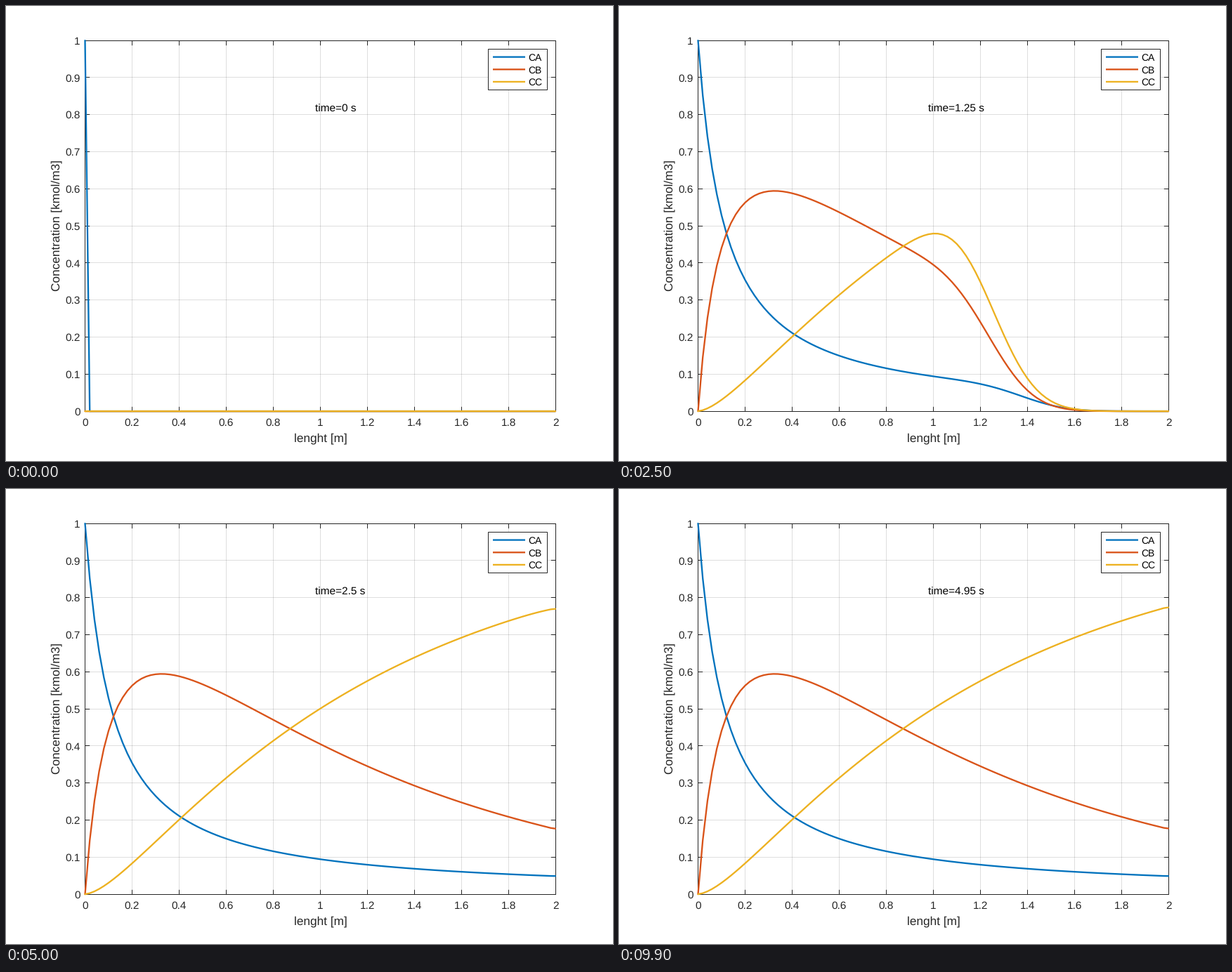
Recreate the animation shown at these times as a matplotlib script. Size 864 by 648 pixels, loop 10000 ms.

```python
import numpy as np
import matplotlib.pyplot as plt
from matplotlib.animation import FuncAnimation
from matplotlib.patches import Rectangle

plt.rcParams["font.family"] = "Liberation Sans"
plt.rcParams["text.hinting"] = "none"

W, H = 864, 648
LEFT, RIGHT, TOP, BOTTOM = 112.5, 782.0, 49.1, 577.1
COLORS = ("#0072BD", "#D95319", "#EDB120")
DARK = "#262626"
LINE_W = 2.31
TICK = 6.7
FRAMES, STEP, SUBSTEPS = 100, 0.05, 24

# Tubular reactor: A -> B (second order), B -> C (first order)
K1, K2, SPEED, DISPERSION = 10.0, 1.0, 1.0, 0.0087
LEAD = 0.007  # the feed enters slightly before the clock starts
x = np.linspace(0, 2, 101)
dx = x[1] - x[0]


def rate(c):
    a, b, _ = c
    r1, r2 = K1 * a * a, K2 * b
    d = np.array([-r1, r1 - r2, r2])
    slope = np.diff(c, axis=1) / dx
    d[:, 1:-1] += (DISPERSION * np.diff(slope, axis=1) / dx
                   - SPEED * (slope[:, 1:] + slope[:, :-1]) / 2)
    # no diffusive flux through the outlet
    d[:, -1] -= (2 * DISPERSION / dx + SPEED) * slope[:, -1]
    d[:, 0] = 0
    return d


def advance(c, span):
    h = span / SUBSTEPS
    for _ in range(SUBSTEPS):
        p = rate(c)
        q = rate(c + h / 2 * p)
        r = rate(c + h / 2 * q)
        s = rate(c + h * r)
        c = c + h / 6 * (p + 2 * q + 2 * r + s)
    return c


def solve():
    start = np.zeros((3, x.size))
    start[0, 0] = 1
    states = [start, advance(start, STEP + LEAD)]
    while len(states) < FRAMES:
        states.append(advance(states[-1], STEP))
    return states


def px(v):
    return LEFT + (RIGHT - LEFT) * v / 2


def py(v):
    return BOTTOM + (TOP - BOTTOM) * v


def mid(v):
    return np.floor(v) + 0.5


fig = plt.figure(figsize=(W / 72, H / 72), dpi=72, facecolor="white")
ax = fig.add_axes([0, 0, 1, 1])
ax.set(xlim=(0, W), ylim=(H, 0))
ax.axis("off")


def stroke(xs, ys, color=DARK, lw=1, z=2, cap="butt", **kw):
    return ax.plot(xs, ys, color=color, lw=lw, zorder=z, snap=False,
                   solid_capstyle=cap, solid_joinstyle="round", **kw)[0]


def label(lx, ly, s, size=15.43, color=DARK, **kw):
    return ax.text(lx, ly, s, fontsize=size, color=color, va="baseline",
                   zorder=6, **kw)


x0, x1, y0, y1 = mid(LEFT), mid(RIGHT), mid(BOTTOM), mid(TOP)

for i in range(11):
    gx, gy = mid(px(i / 5)), mid(py(i / 10))
    if 0 < i < 10:
        stroke([gx, gx], [y0, y1], alpha=0.15, z=1)
        stroke([x0, x1], [gy, gy], alpha=0.15, z=1)
    stroke([gx, gx], [y0, y0 - TICK])
    stroke([gx, gx], [y1, y1 + TICK])
    stroke([x0, x0 + TICK], [gy, gy])
    stroke([x1, x1 - TICK], [gy, gy])
    label(px(i / 5), 598.3, f"{i / 5:g}", ha="center")
    label(105.5, py(i / 10) + 5.6, f"{i / 10:g}", ha="right")

ax.add_patch(Rectangle((x0, y1), x1 - x0, y0 - y1, fill=False, ec=DARK,
                       lw=1, snap=False, zorder=2))
label(447.5, 620.5, "lenght [m]", size=17.2, ha="center")
label(76.5, 312.8, "Concentration [kmol/m3]", size=17.2, ha="center",
      rotation=90, rotation_mode="anchor")

ax.add_patch(Rectangle((686.5, 61.5), 84, 58, fc="white", ec=DARK, lw=1,
                       snap=False, zorder=4))
for name, color, ly in zip(("CA", "CB", "CC"), COLORS, (72.6, 90.3, 107.9)):
    stroke([693, 739], [ly, ly], color, LINE_W, z=5)
    label(743.5, ly + 5.3, name, size=13.9, color="black")

states = solve()
curves = [stroke([], [], color, LINE_W, z=3, cap="round", clip_on=False)
          for color in COLORS]
clock = label(439.7, 150.6, "", color="black")


def draw(i):
    for curve, c in zip(curves, states[i]):
        curve.set_data(px(x), py(c))
    clock.set_text(f"time={round(i * STEP, 2):g} s")
    return [*curves, clock]


anim = FuncAnimation(fig, draw, frames=FRAMES, interval=100, repeat=True,
                     repeat_delay=0, blit=False)
plt.show()
```
